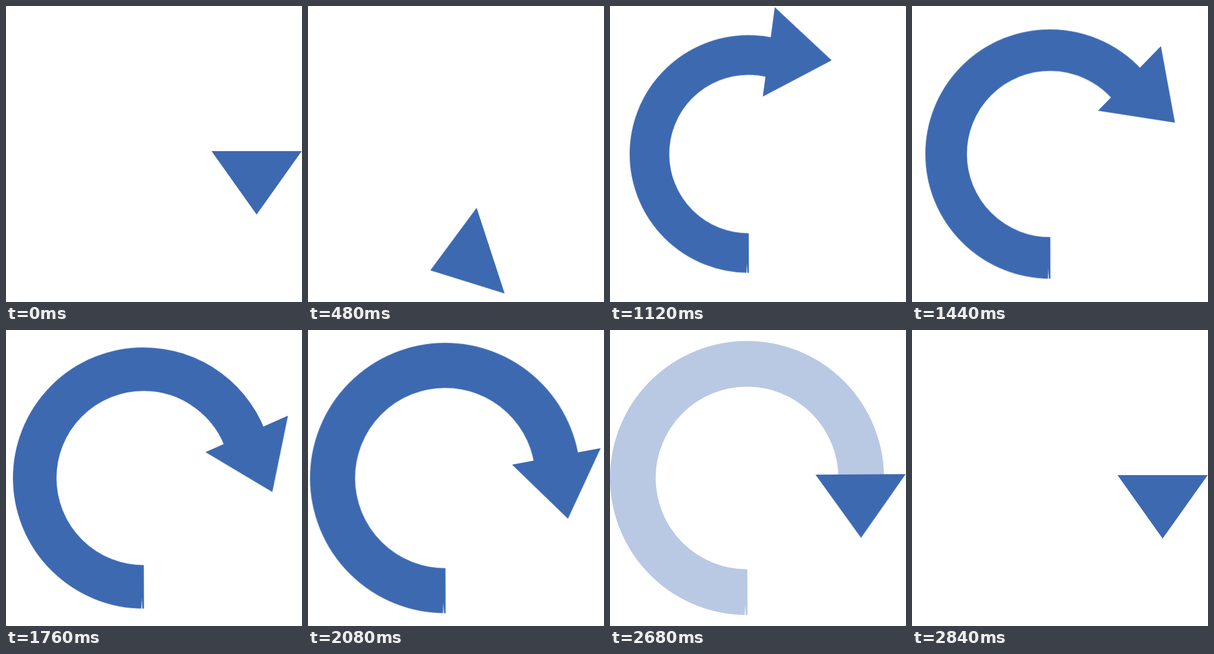
An HTML page without scripts for the animation above (2880 ms loop, 512 px wide and 512 px high).

```html
<!DOCTYPE html>
<html lang="en">
<head>
<meta charset="utf-8">
<title>Circular arrow</title>
<style>
  html, body { margin: 0; width: 100%; height: 100%; overflow: hidden; background: #fff; }
  svg { display: block; width: 100%; height: 100%; }

  .arrow, .ring, .arc { animation: 2880ms linear infinite; }
  .arrow { fill: #3d69b1; animation-name: spin; }
  .ring { animation-name: grow, fade; animation-duration: 2880ms, 2880ms; }
  .arc {
    fill: none;
    stroke: #3d69b1;
    stroke-width: 79;
    stroke-dasharray: 360 720;
    animation-name: draw;
  }

  /* The arrow and the end of the arc share one easing. */
  @keyframes spin {
    0% { transform: rotate(0deg); animation-timing-function: cubic-bezier(.333, 0, 0, 1); }
    98.611%, 100% { transform: rotate(360deg); }
  }
  @keyframes draw {
    0% { stroke-dashoffset: 443; animation-timing-function: cubic-bezier(.333, 0, 0, 1); }
    98.611%, 100% { stroke-dashoffset: 83; }
  }
  @keyframes grow {
    0% { transform: scale(.825); }
    18.056% { transform: scale(.825); animation-timing-function: cubic-bezier(.333, 0, .667, 1); }
    83.333%, 100% { transform: scale(1); }
  }
  @keyframes fade {
    0%, 18% { opacity: 0; }
    18.001%, 83.333% { opacity: 1; }
    98.611%, 100% { opacity: 0; }
  }
</style>
</head>
<body>
<svg viewBox="-256 -256 512 512">
  <g class="ring">
    <g transform="translate(-19 0)">
      <circle class="arc" r="197.5" pathLength="360" transform="rotate(89.8)"/>
      <!-- thin nick beside the tail -->
      <path d="M-3 218L-4.1 238H-2.2Z" fill="#fff"/>
    </g>
  </g>
  <path class="arrow" d="M99.5-5H255.5L177.5 104.8Z"/>
</svg>
</body>
</html>
```
